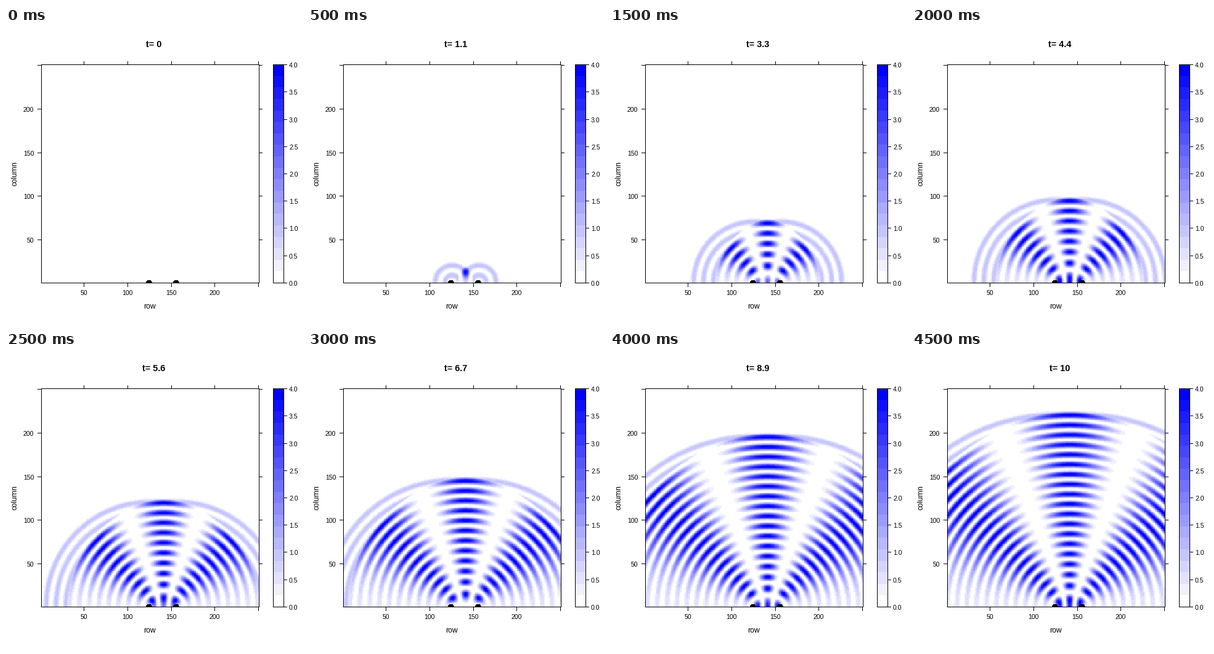
Animation of 480 by 480 pixels, one loop 5 s. Source, as a matplotlib script:

```python
import numpy as np
import matplotlib.pyplot as plt
from matplotlib.animation import FuncAnimation
from matplotlib.collections import LineCollection
from matplotlib.colors import ListedColormap
from matplotlib.patches import Circle, Rectangle

SIZE, DPI = 480, 100
PX = 72 / DPI                      # points per pixel
FRAMES, INTERVAL = 10, 500
T_END = 10

CELLS = 250
WAVELENGTH = 22.5                  # cells; the period is one time unit
SOURCES = (125, 156)
LEVELS = 19
V_MAX = 4

LEFT, RIGHT, TOP, BOTTOM = 57, 410, 59, 413
KEY_LEFT, KEY_RIGHT = 433, 450
TICK = 6

plt.rcParams["font.family"] = "Liberation Sans"

fig = plt.figure(figsize=(SIZE / DPI, SIZE / DPI), dpi=DPI, facecolor="white")
ax = fig.add_axes([0, 0, 1, 1])
ax.axis("off")

fade = np.linspace(1, 0, LEVELS)
cmap = ListedColormap(np.column_stack([fade, fade, np.ones(LEVELS)]))

rows, cols = np.meshgrid(np.arange(1, CELLS + 1), np.arange(1, CELLS + 1))
distances = [np.hypot(rows - s, cols - 1) for s in SOURCES]


def intensity(t):
    """Squared sum of two circular waves that start at t = 0."""
    total = np.zeros((CELLS, CELLS))
    for r in distances:
        age = t - r / WAVELENGTH
        total += np.where(age > 0, np.sin(2 * np.pi * age), 0)
    return total ** 2


def show(data, x0, x1):
    return ax.imshow(data, cmap=cmap, vmin=0, vmax=V_MAX, origin="lower",
                     interpolation="nearest", aspect="auto", zorder=1,
                     extent=(x0 + .5, x1 + .5, BOTTOM + .5, TOP + .5))


def frame_box(x0, x1):
    box = Rectangle((x0 + .5, TOP + .5), x1 - x0, BOTTOM - TOP, fill=False,
                    ec="black", lw=PX, joinstyle="miter", snap=False, zorder=4)
    ax.add_patch(box)
    return box


def label(x, y, text, size, ha="center", **kw):
    return ax.text(x, y, text, fontsize=size * PX, ha=ha, va="baseline", **kw)


wave = show(intensity(0), LEFT, RIGHT)
show((np.arange(LEVELS)[:, None] + .5) * V_MAX / LEVELS, KEY_LEFT, KEY_RIGHT)
plot_box = frame_box(LEFT, RIGHT)
frame_box(KEY_LEFT, KEY_RIGHT)

for s in SOURCES:
    x = LEFT + .5 + (s - 1.5) * (RIGHT - LEFT) / CELLS
    dot = Circle((x, BOTTOM + .8), 4.5, fc="black", lw=0, antialiased=False, zorder=3)
    ax.add_patch(dot)
    dot.set_clip_path(plot_box)

ticks = []
for v in range(50, CELLS + 1, 50):
    x = int(LEFT + (v - .5) * (RIGHT - LEFT) / CELLS)
    y = int(BOTTOM + .8 - (v - .5) * (BOTTOM - TOP) / CELLS)
    ticks += [[(x + .5, BOTTOM), (x + .5, BOTTOM + 1 + TICK)],
              [(x + .5, TOP - TICK + 1), (x + .5, TOP)],
              [(LEFT - TICK, y + .5), (LEFT, y + .5)],
              [(RIGHT, y + .5), (RIGHT + TICK, y + .5)]]
    if v < CELLS:
        label(x + .3, 433, str(v), 10.5)
        label(45.3, y + 5, str(v), 10.5, ha="right")

for i in range(9):
    y = round(BOTTOM - i * (BOTTOM - TOP) / 8)
    ticks.append([(KEY_RIGHT, y + .5), (KEY_RIGHT + TICK, y + .5)])
    label(459, y + 5, f"{i / 2:.1f}", 10.5, ha="left")

ax.add_collection(LineCollection(ticks, colors="black", linewidths=PX,
                                 capstyle="butt", snap=False, zorder=4))

label(233, 455, "row", 12.3)
label(17, 236, "column", 12.3, rotation=90, rotation_mode="anchor")
title = label(239.5, 31, "", 14.4, weight="bold")

ax.set_xlim(0, SIZE)
ax.set_ylim(SIZE, 0)


def update(i):
    t = T_END * i / (FRAMES - 1)
    wave.set_data(intensity(t))
    title.set_text(f"t= {t:.2g}")
    return wave, title


anim = FuncAnimation(fig, update, frames=FRAMES, interval=INTERVAL, repeat=True)
plt.show()
```
